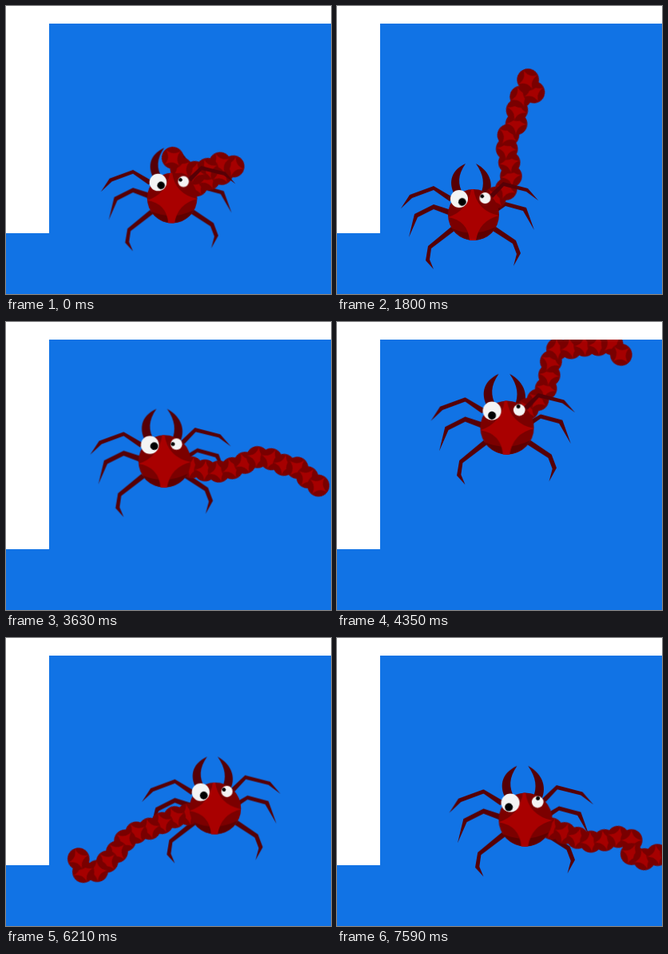
Recreate the animation shown at these times as an HTML page without scripts. Size 407 px wide and 360 px high, loop 7710 ms.

```html
<!DOCTYPE html>
<html lang="en">
<head>
<meta charset="utf-8">
<title>Scorpion</title>
<style>
html, body { margin: 0; width: 100%; height: 100%; overflow: hidden; background: #fff; }
svg { display: block; width: 407px; height: 360px; }

.place, .size, .tail, .joint, .pupil { animation: 7710ms linear infinite; }
.place { animation-name: roam; }
.size { animation-name: breathe; }
.tail { animation-name: sweep; }
.joint { animation-name: bend; }
.pupil { animation-name: roll; }

@keyframes roam {
  0%, 6.61% { transform: translate(208px, 240px); }
  16.86% { transform: translate(203px, 244px); }
  23.35% { transform: translate(171px, 261px); }
  27.24% { transform: translate(152px, 264px); }
  37.74% { transform: translate(186px, 187px); }
  46.69% { transform: translate(198px, 176px); }
  56.42% { transform: translate(213px, 132px); }
  66.93% { transform: translate(223px, 155px); }
  73.93% { transform: translate(243px, 187px); }
  80.54% { transform: translate(262px, 213px); }
  89.49% { transform: translate(259px, 228px); }
  98.44%, 100% { transform: translate(236px, 227px); }
}
@keyframes breathe {
  0%, 6.61% { transform: scale(.98); }
  23.35%, 37.74% { transform: scale(1); }
  56.42% { transform: scale(1.05); }
  66.93% { transform: scale(.93); }
  80.54% { transform: scale(1.01); }
  98.44%, 100% { transform: scale(1.05); }
}
@keyframes sweep {
  0%, 6.61% { transform: rotate(-27deg); }
  16.86% { transform: rotate(-12deg); }
  23.35% { transform: rotate(-38deg); }
  27.24% { transform: rotate(-110deg); }
  37.74% { transform: rotate(-227deg); }
  46.69% { transform: rotate(-345deg); }
  56.42% { transform: rotate(-402deg); }
  66.93% { transform: rotate(-453deg); }
  73.93% { transform: rotate(-505deg); }
  80.54% { transform: rotate(-552deg); }
  89.49% { transform: rotate(-640deg); }
  98.44%, 100% { transform: rotate(-701deg); }
}
/* Each joint supplies its own bend, in degrees, for the seven poses a to g. */
@keyframes bend {
  0%, 6.61% { transform: translate(17.3px, 0) rotate(calc(var(--a) * -1deg)); }
  23.35% { transform: translate(17.3px, 0) rotate(calc(var(--b) * -1deg)); }
  37.74% { transform: translate(17.3px, 0) rotate(calc(var(--c) * -1deg)); }
  56.42% { transform: translate(17.3px, 0) rotate(calc(var(--d) * -1deg)); }
  66.93% { transform: translate(17.3px, 0) rotate(calc(var(--e) * -1deg)); }
  80.54% { transform: translate(17.3px, 0) rotate(calc(var(--f) * -1deg)); }
  98.44%, 100% { transform: translate(17.3px, 0) rotate(calc(var(--g) * -1deg)); }
}
@keyframes roll {
  0%, 6.61% { transform: rotate(45deg); }
  23.35% { transform: rotate(765deg); }
  37.74% { transform: rotate(1020deg); }
  56.42% { transform: rotate(1890deg); }
  66.93% { transform: rotate(2330deg); }
  80.54% { transform: rotate(2925deg); }
  98.44%, 100% { transform: rotate(3710deg); }
}
</style>
</head>
<body>
<svg viewBox="0 0 407 360">
  <defs>
    <clipPath id="pool"><path d="M54 22H407V360H54Z"/></clipPath>
    <g id="ball">
      <circle r="13.8" fill="#790000"/>
      <path d="M0-13.5Q1.500-1.500 13.500 0Q1.500 1.500 0 13.500Q-1.500 1.500-13.500 0Q-1.500-1.500 0-13.500Z" fill="#a60000"/>
    </g>
  </defs>

  <path d="M54 22H407V360H0V284H54Z" fill="#1173e5"/>

  <g clip-path="url(#pool)">
    <g class="place">
      <!-- horns, middle and lower legs -->
      <g class="size" fill="#560006">
        <path d="M-10-64C-30-55-32-38-22-22L-13-26C-20-38-20-50-10-64Z"/>
        <path d="M3-64C22-54 26-36 18-22L9-26C14-38 13-50 3-64Z"/>
        <path d="M-28-6L-50-13-74-1-81 28-70 3-50-7-29 1Z"/>
        <path d="M28-9L40-16 66-9 76 19 62-5 40-11 30-4Z"/>
        <path d="M-28 15L-57 39-60 57-50 68-55 56-53 42-24 20Z"/>
        <path d="M28 15L53 32 59 48 50 64 54 49 49 36 24 20Z"/>
      </g>

      <g class="tail">
        <use href="#ball" x="17.3"/>
        <use href="#ball" x="34.6"/>
        <g transform="translate(34.6)">
          <g class="joint" style="--a:-5;--b:31;--c:4;--d:12;--e:16;--f:13;--g:-1"><use href="#ball"/>
          <g class="joint" style="--a:11;--b:28;--c:15;--d:22;--e:-3;--f:-1;--g:4"><use href="#ball"/>
          <g class="joint" style="--a:133;--b:3;--c:11;--d:7;--e:0;--f:-8;--g:22"><use href="#ball"/>
          <g class="joint" style="--a:39;--b:-16;--c:23;--d:-20;--e:-16;--f:19;--g:8"><use href="#ball"/>
          <g class="joint" style="--a:-5;--b:-30;--c:-7;--d:-59;--e:-5;--f:19;--g:-28"><use href="#ball"/>
          <g class="joint" style="--a:-37;--b:33;--c:-37;--d:6;--e:10;--f:-9;--g:-76"><use href="#ball"/>
          <g class="joint" style="--a:-173;--b:-13;--c:31;--d:-7;--e:5;--f:-2;--g:68"><use href="#ball"/>
          <g class="joint" style="--a:175;--b:-55;--c:-62;--d:0;--e:10;--f:-40;--g:40"><use href="#ball"/>
          <g class="joint" style="--a:-35;--b:96;--c:65;--d:-53;--e:10;--f:-73;--g:-8"><use href="#ball"/>
            <use href="#ball" x="17.3"/>
          </g></g></g></g></g></g></g></g></g>
        </g>
      </g>

      <!-- upper legs, body and eyes -->
      <g class="size">
        <g fill="#560006">
          <path d="M-26-22L-50-36-80-25-91-8-77-21-50-31-30-17Z"/>
          <path d="M20-25L37-41 68-33 81-18 66-29 38-36 24-21Z"/>
        </g>
        <circle r="32" fill="#7b0000"/>
        <path d="M-27 17Q0 29 28 15A32 32 0 0 1-27 17Z" fill="#5e0000"/>
        <path d="M0-32Q4-5 32 1Q7 7 3 32L-5 32Q-7 7-32 3Q-7-5-3-32Z" fill="#a90000"/>
        <g transform="translate(-18 -20)">
          <circle r="11" fill="#f4f4f4"/>
          <g class="pupil"><circle cx="5.500" r="4.800"/></g>
        </g>
        <g transform="translate(14.500 -21)">
          <circle r="7" fill="#f4f4f4"/>
          <g class="pupil"><circle cx="-4.200" cy="1.100" r="2.400"/></g>
        </g>
      </g>
    </g>
  </g>
</svg>
</body>
</html>
```
